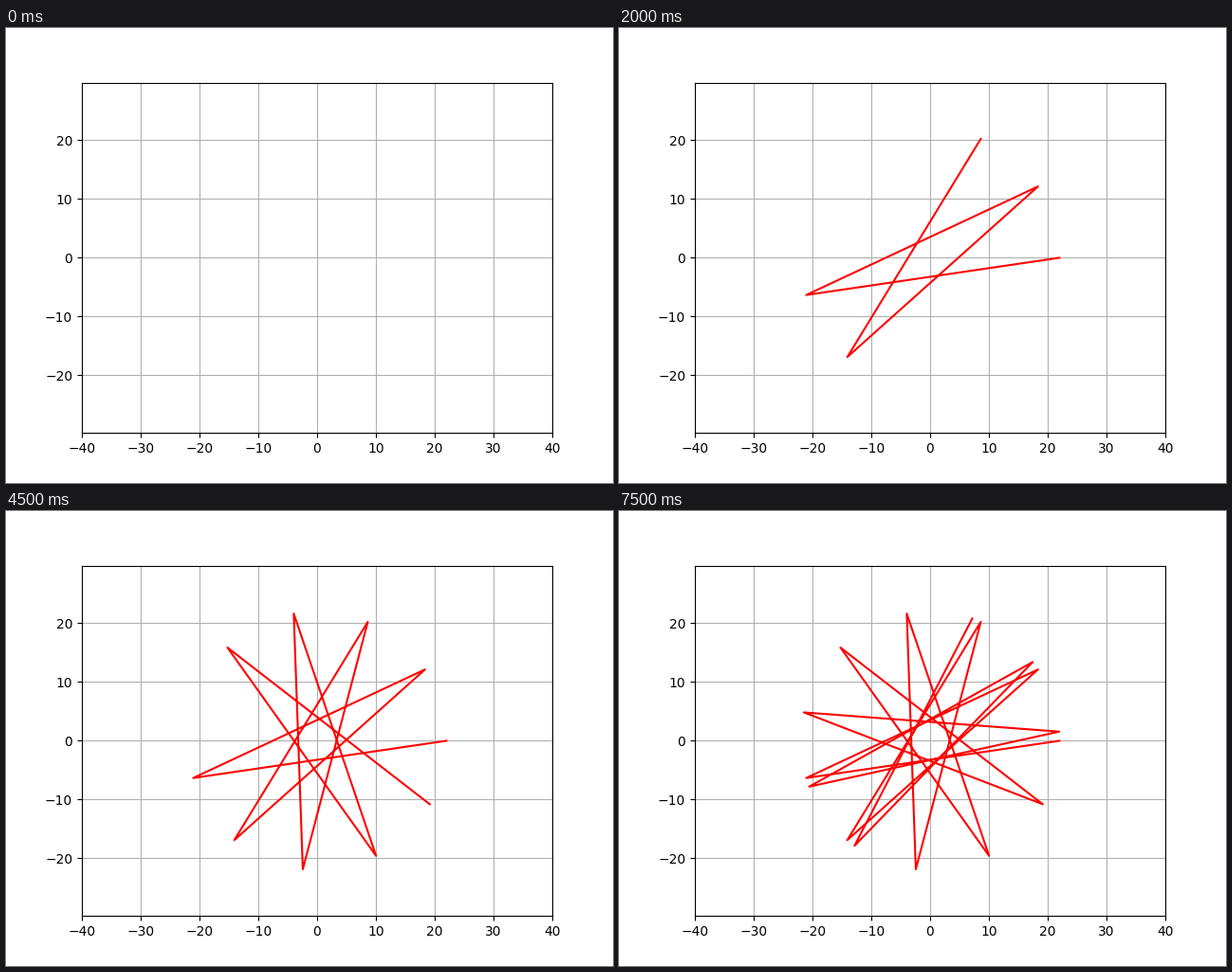
A matplotlib script that plays this animation: 640x480 px, repeating every 8 s.

```python
import numpy as np
import matplotlib.pyplot as plt
from matplotlib.animation import FuncAnimation

RADIUS = 22
STEP = 16  # radians between neighbouring points
FRAMES = 16

angles = STEP * np.arange(FRAMES)
xs, ys = RADIUS * np.cos(angles), RADIUS * np.sin(angles)

fig, ax = plt.subplots(figsize=(6.4, 4.8), dpi=100)
half_height = 40 * 369.6 / 496  # equal scale on both axes
ax.set_xlim(-40, 40)
ax.set_ylim(-half_height, half_height)
ax.set_xticks(np.arange(-40, 41, 10))
ax.set_yticks(np.arange(-20, 21, 10))
ax.grid(True)
line, = ax.plot([], [], color="red", lw=1.5)


def init():
    line.set_data([], [])
    return line,


def update(i):
    # A single point leaves the plot empty; each step adds one stroke.
    line.set_data(xs[:i + 1], ys[:i + 1])
    return line,


anim = FuncAnimation(fig, update, frames=FRAMES, init_func=init,
                     interval=500, repeat=True, repeat_delay=0)
plt.show()
```
